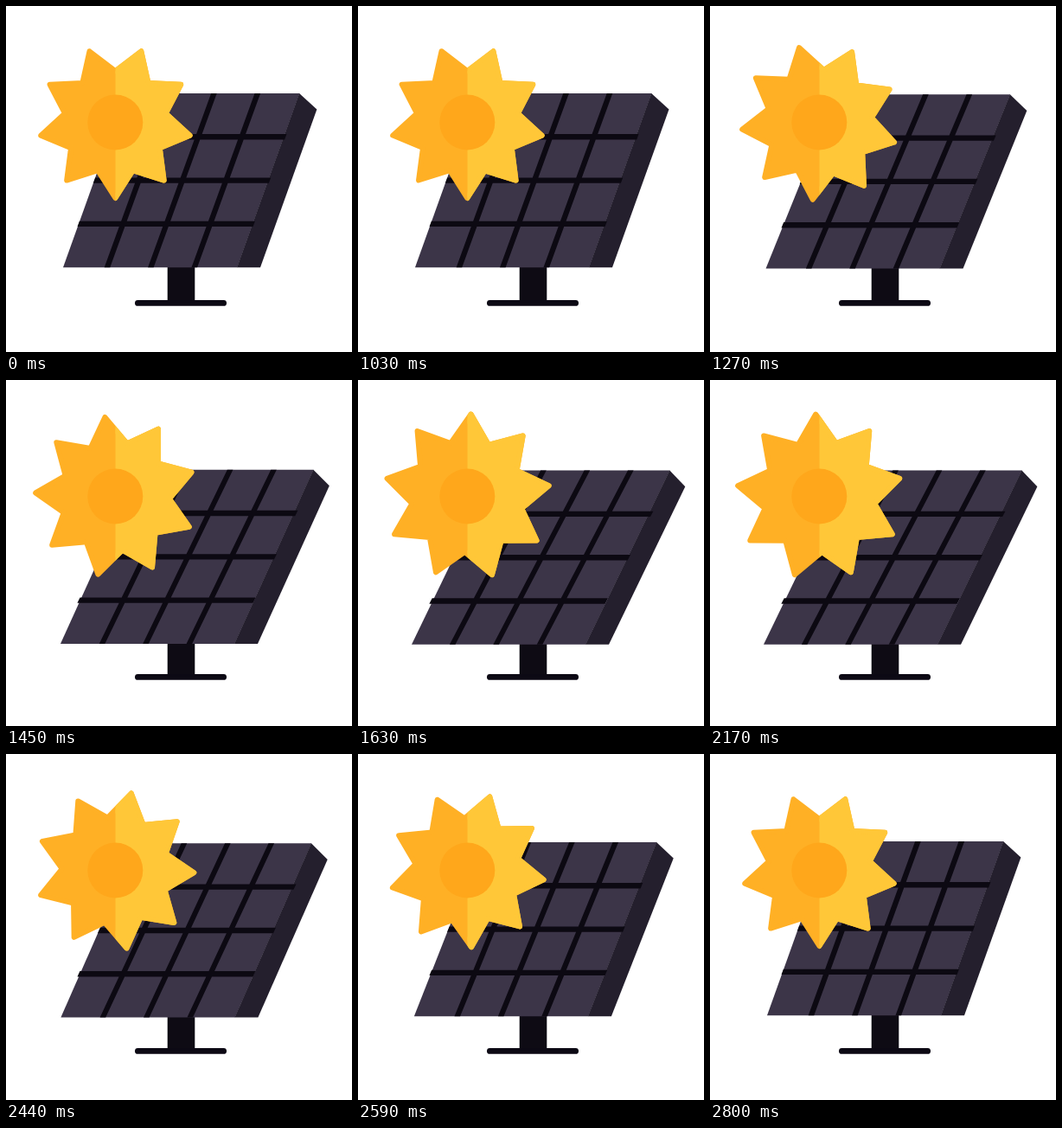
These frames come from a looping animation (400x400 px, 2.83 s). An HTML page:

```html
<!DOCTYPE html>
<html lang="en">
<head>
<meta charset="utf-8">
<title>Solar panel</title>
<style>
  html, body { margin: 0; width: 100%; height: 100%; overflow: hidden; background: #fff; }
  svg { display: block; width: 100%; height: 100%; }
</style>
</head>
<body>
<svg viewBox="0 0 400 400">
  <defs>
    <clipPath id="rightHalf"><rect x="126.5" y="0" width="200" height="300"/></clipPath>
    <path id="star" stroke-width="6" stroke-linejoin="round"/>
  </defs>

  <rect x="186.7" y="290" width="31.6" height="52" fill="#0e0b14"/>
  <rect x="149" y="340" width="106" height="6.8" rx="3.4" fill="#0c0914"/>

  <g id="panel">
    <path d="M0 0V-201.3H201.3V0Z" fill="#3c3548"/>
    <path d="M201 0V-201.3L228 -182.6V0Z" fill="#241f2d"/>
  </g>
  <path id="grid" fill="#0c0912"/>

  <use href="#star" fill="#ffb025" stroke="#ffb025"/>
  <g clip-path="url(#rightHalf)"><use href="#star" fill="#ffc738" stroke="#ffc738"/></g>
  <circle cx="126.3" cy="134.5" r="32" fill="#ffa71b"/>
</svg>
<script>
  const LOOP = 2830, HOLD = 1000, STEP = 30;
  const SUN = { x: 126.4, y: 134.5, points: 9, tip: 87.5, valley: 59.3 };
  const [star, panel, grid] = ['star', 'panel', 'grid'].map(id => document.getElementById(id));

  const lerp = (a, b, t) => a + (b - a) * t;
  const ease = (from, to, k) => {
    const t = Math.min(1, Math.max(0, (k - from) / (to - from)));
    return t * t * (3 - 2 * t);
  };
  const box = (x, y, w, h) => `M${x} ${y}h${w}v${h}h${-w}z`;
  const skew = (slope, x, y) => `matrix(1 0 ${-slope} 1 ${x} ${y})`;

  grid.setAttribute('d', [-1, 0, 1].map(i =>
    box(98.6 + i * 50.4, -100.6, 6.6, 201.2) + box(0, i * 50.3 - 3.2, 203, 6.4)
  ).join(''));

  // Only the outline turns and grows; the colour split stays vertical.
  function starPath(turn, scale) {
    const corners = Array.from({ length: SUN.points * 2 }, (_, i) => {
      const angle = (90 + turn + i * 180 / SUN.points) * Math.PI / 180;
      const r = (i % 2 ? SUN.valley : SUN.tip) * scale;
      return `${(SUN.x + r * Math.cos(angle)).toFixed(2)} ${(SUN.y + r * Math.sin(angle)).toFixed(2)}`;
    });
    return `M${corners.join('L')}Z`;
  }

  function draw(ms) {
    const k = Math.max(0, Math.floor((ms % LOOP - HOLD) / STEP));
    const swell = ease(0, 30, k) - ease(30, 60, k);
    const lean = ease(0, 22, k) - ease(40, 60, k);

    star.setAttribute('d', starPath(80 * ease(0, 60, k), 1 + 0.11 * swell));

    const y = lerp(302.2, 305.8, lean);
    panel.setAttribute('transform', skew(lerp(0.358, 0.484, lean), lerp(66, 62, lean), y));
    grid.setAttribute('transform', skew(lerp(0.363, 0.524, lean), lerp(102, 110.4, lean), y - 100.6));
  }

  const start = performance.now();
  function tick() {
    draw(performance.now() - start);
    requestAnimationFrame(tick);
  }
  tick();
</script>
</body>
</html>
```
